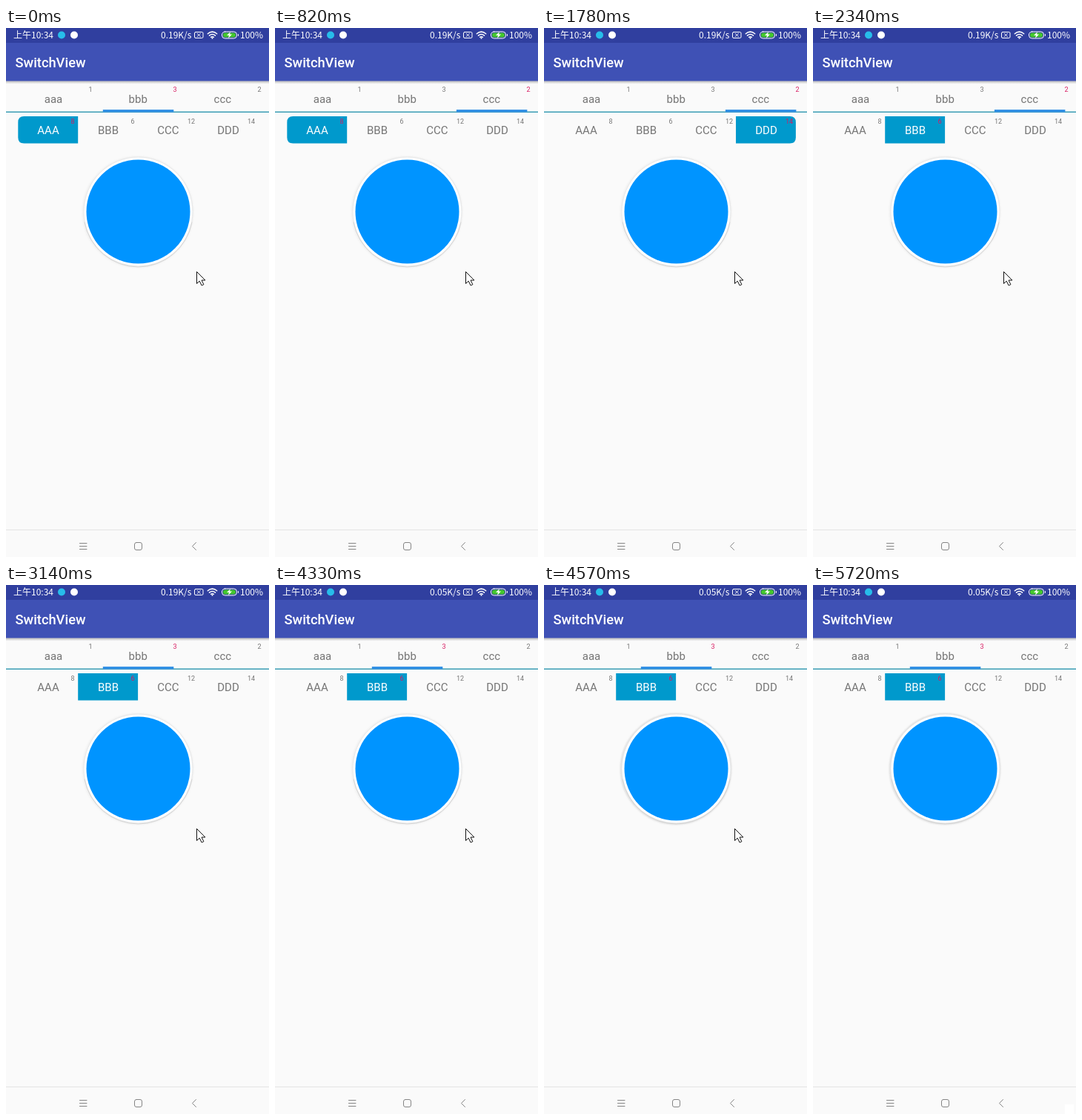
Write an HTML page that moves like this. It is 355 px wide and 713 px high and loops after 5820 ms.

```html
<!DOCTYPE html>
<html lang="en">
<head>
<meta charset="utf-8">
<title>SwitchView</title>
<style>
html, body { margin: 0; width: 100%; height: 100%; overflow: hidden; background: #fafafa; }
svg { display: block; }
text { font-family: Roboto, sans-serif; }
.status text { font: 12px "Noto Sans CJK SC", "Noto Sans CJK", "Noto Sans", sans-serif; fill: #fff; }
.title { font-size: 18.3px; font-weight: 500; fill: #fff; }
.label { font-size: 15px; text-anchor: middle; fill: #757575; }
.badge { font-size: 9px; text-anchor: middle; fill: #757575; }
.badge.on { fill: #d81b60; }
.bottom .label.on { fill: #fff; }
.line { fill: none; stroke-linecap: round; stroke-linejoin: round; }
</style>
</head>
<body>
<svg width="355" height="713" viewBox="0 0 355 713">
  <defs>
    <linearGradient id="shade" x2="0" y2="1">
      <stop stop-color="#000" stop-opacity=".25"/>
      <stop offset="1" stop-color="#000" stop-opacity="0"/>
    </linearGradient>
    <filter id="soft"><feGaussianBlur stdDeviation="1"/></filter>
  </defs>

  <rect width="355" height="713" fill="#fafafa"/>
  <rect y="20" width="355" height="51.5" fill="#3f51b5"/>
  <rect width="355" height="20" fill="#303f9f"/>
  <rect y="71.5" width="355" height="4" fill="url(#shade)"/>
  <text class="title" x="12.5" y="53">SwitchView</text>

  <g class="status">
    <text x="10" y="14">上午10:34</text>
    <circle cx="75" cy="9.5" r="5" fill="#27bdea"/>
    <circle cx="92" cy="9.5" r="5" fill="#fff"/>
    <text id="speed" x="209" y="14"></text>
    <g class="line" stroke="#fff">
      <rect x="254.5" y="5.5" width="11.5" height="8" rx="1.5"/>
      <path d="M258.3 7.5l4 4m0-4l-4 4"/>
      <path stroke-width="1.5" d="M272.3 7.8q6.2-5.4 12.4 0M274.5 10.2q4-3.2 8 0M276.6 12.3q1.9-1.3 3.8 0"/>
      <rect x="291.5" y="5" width="20" height="9" rx="4"/>
      <path d="M313.5 8.5v2"/>
    </g>
    <circle cx="278.5" cy="13.7" r="1" fill="#fff"/>
    <rect x="293" y="6.5" width="17" height="6" rx="2.8" fill="#43c72c"/>
    <path d="M303 5l-5 5h3l-1 4 5-5.500h-3z" fill="#fff"/>
    <text x="316" y="14">100%</text>
  </g>

  <rect y="112.500" width="355" height="1.500" fill="#3a9db5"/>
  <rect id="marker" y="110" width="95.500" height="3.500" fill="#3390e4"/>
  <g class="top"></g>
  <path id="button" fill="#0099cc"/>
  <g class="bottom"></g>

  <circle id="glow" cx="178" cy="248" r="74" fill="none" stroke="#bbb" stroke-width="1.500" filter="url(#soft)"/>
  <circle cx="178.500" cy="247.500" r="73.500" fill="#fff" stroke="#e2e2e2" stroke-width=".8"/>
  <path class="line" stroke="#cfcfcf" stroke-width=".8" d="M106 262A73.800 73.800 0 0 0 251 262"/>
  <circle cx="178.500" cy="247.500" r="70" fill="#0094ff"/>

  <path d="M0 676.500H355" stroke="#e4e4e4"/>
  <g class="line" stroke="#858585">
    <path d="M99.500 694.500h9.500m-9.500 4h9.500m-9.500 4h9.500M256.500 693.500l-5 5 5 5"/>
    <rect x="173.500" y="693.500" width="10" height="10" rx="2.500"/>
  </g>

  <rect id="patch" x="340" y="700" width="12" height="13" fill="#fff"/>
  <path id="cursor" fill="#fff" stroke="#111" stroke-linejoin="round"
    d="M.5.500v16l3.700-3.400 2.900 5.900 2.800-1.300-2.900-5.700h4.900z"/>
</svg>
<script>
const LOOP = 5820;
const $ = s => document.querySelector(s);

// Each step is [start time, value]; the latest one that has started holds.
const topSteps = [[0, 1], [270, 2], [2740, 0], [3140, 1]];
const bottomSteps = [[0, 0], [1070, 1], [1500, 2], [1780, 3], [2340, 1]];
const speedSteps = [[0, '0.19K/s'], [3690, '0.05K/s']];
const cursorSteps = [[0, [257, 328]], [4870, [315, 347]], [5020, [342, 425]],
  [5150, [339, 514]], [5290, [340, 700]], [5450, [400, 760]]];
const at = (steps, t) => steps.findLast(s => s[0] <= t)[1];

function addTabs(sel, labels, badges, x, pitch, y, badgeX, badgeY) {
  $(sel).innerHTML = labels.map((label, i) =>
    `<text class="label" x="${x + i * pitch}" y="${y}">${label}</text>` +
    `<text class="badge" x="${badgeX[i]}" y="${badgeY}">${badges[i]}</text>`).join('');
}

function select(sel, index) {
  [...$(sel).children].forEach((el, i) => el.classList.toggle('on', i >> 1 === index));
}

addTabs('.top', ['aaa', 'bbb', 'ccc'], [1, 3, 2], 64, 114.2, 100.7, [114, 228, 342], 86.3);
addTabs('.bottom', ['AAA', 'BBB', 'CCC', 'DDD'], [8, 6, 12, 14], 57, 81, 143.2,
  [90, 171, 250, 331], 129.2);

function buttonPath(i) {
  const x = 16.3 + i * 80.9, r = x + 80.9;
  if (i === 0) return `M${r} 119V155.500H${x + 8}q-8 0-8-8V127q0-8 8-8z`;
  if (i === 3) return `M${x} 119V155.500H${r - 8}q8 0 8-8V127q0-8-8-8z`;
  return `M${x} 119H${r}V155.500H${x}z`;
}

function draw(now) {
  const t = now % LOOP;
  const tab = at(topSteps, t), button = at(bottomSteps, t);
  select('.top', tab);
  select('.bottom', button);
  $('#marker').setAttribute('x', 16.7 + tab * 114.1);
  $('#button').setAttribute('d', buttonPath(button));
  $('#speed').textContent = at(speedSteps, t);
  $('#cursor').setAttribute('transform', `translate(${at(cursorSteps, t)})`);
  $('#glow').setAttribute('opacity', t < 4570 ? 0.25 : 0.7);
  $('#patch').setAttribute('opacity', t < 5450 ? 0 : 1);
  requestAnimationFrame(draw);
}
requestAnimationFrame(draw);
</script>
</body>
</html>
```
